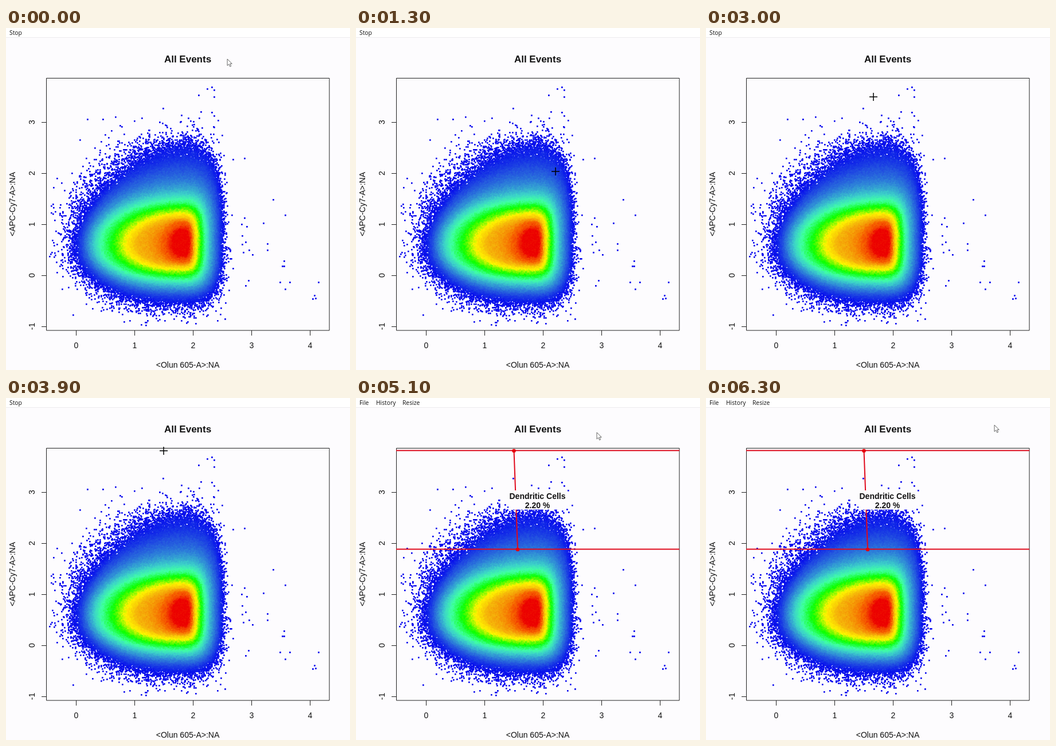
Write an HTML page with a canvas that moves like this. It is 600 px wide and 596 px high and loops after 6400 ms.

```html
<!DOCTYPE html>
<html lang="en">
<head>
<meta charset="utf-8">
<title>All Events</title>
<style>
  html, body { margin: 0; width: 100%; height: 100%; overflow: hidden; background: #fdfcfe; }
  canvas, svg { position: absolute; left: 0; top: 0; }
  svg { font: 14px "Liberation Sans", Arial, sans-serif; fill: #111; }
  .menu { font: 10.3px "Open Sans", "Noto Sans", sans-serif; }
  .mid { text-anchor: middle; }
  .bold { font-weight: bold; }
  .gate { stroke: #e00a1c; stroke-width: 2; fill: none; }
  .dot { fill: #e8000c; }
</style>
</head>
<body>
<canvas id="cloud" width="600" height="596"></canvas>
<svg width="600" height="596" viewBox="0 0 600 596">
  <rect width="600" height="16" fill="#fff"/>
  <path d="M0 16.5H600" stroke="#ececee"/>
  <text id="stop" class="menu" x="6" y="12">Stop</text>
  <g id="menu" class="menu">
    <text x="6" y="12">File</text><text x="35" y="12">History</text><text x="81" y="12">Resize</text>
  </g>
  <text class="mid bold" x="317" y="59.500" font-size="17">All Events</text>
  <g id="axes"><path d="M70.500 87.500H564V527H70.500Z" fill="none" stroke="#222"/></g>
  <text class="mid" x="317" y="592">&lt;Olun 605-A&gt;:NA</text>
  <text class="mid" transform="translate(16 307) rotate(-90)">&lt;APC-Cy7-A&gt;:NA</text>
  <g id="gate">
    <path class="gate" d="M70 91.500H564M70 263.500H564M275.500 92L282 264"/>
    <circle class="dot" cx="275.500" cy="92" r="3.300"/>
    <rect x="266" y="161" width="101" height="33.500" fill="#fdfcfe"/>
    <text class="mid bold" x="316.500" y="176">Dendritic Cells</text>
    <text class="mid bold" x="316.500" y="192">2.20 %</text>
  </g>
  <circle id="firstDot" class="dot" cx="282" cy="264" r="3.300"/>
  <path id="cross" d="M-7 0H7M0 -7V7" stroke="#000" stroke-width="1.500"/>
  <path id="arrow" d="M0 0V11.500L2.700 9L4.700 13.300L6.600 12.400L4.700 8.300H8.200Z" fill="#fff" stroke="#555" stroke-width=".9"/>
</svg>
<script>
const $ = id => document.getElementById(id);
const CENTER_X = 308, CENTER_Y = 376, LOOP = 6400;

// Density contours, inside out: left, right, top, bottom, upper-left roundness, colour
const LEVELS = [
  [290, 320, 352, 397, 2, [236, 0, 0]],
  [272, 325, 338, 409, 2, [246, 100, 0]],
  [228, 328, 332, 414, 1.9, [245, 180, 10]],
  [208, 333, 323, 421, 1.9, [255, 245, 0]],
  [186, 341, 311, 431, 2, [10, 255, 0]],
  [165, 348, 300, 440, 2, [64, 255, 165]],
  [155, 353, 290, 446, 2, [60, 212, 200]],
  [143, 362, 272, 456, 1.9, [48, 140, 215]],
  [134, 370, 245, 465, 1.8, [34, 80, 224]],
  [121, 378, 205, 479, 1.6, [8, 18, 236]],
  [101, 385, 186, 500, 2, [0, 0, 238]]
];

const OUTLIERS = [
  142,159, 169,159, 199,170, 274,140, 336,117, 351,106, 359,103, 363,108, 363,120, 340,146,
  359,147, 363,153, 306,152, 305,163, 318,157, 327,163, 268,164, 416,227, 396,229, 466,299,
  487,326, 449,340, 416,331, 411,342, 420,346, 412,362, 418,373, 412,377, 456,376, 456,387,
  424,387, 430,395, 485,406, 482,415, 485,415, 423,440, 418,449, 414,391, 478,443, 495,443,
  487,455, 545,443, 538,466, 540,471, 535,472, 382,507, 247,510, 88,408, 95,308, 102,283
];

let seed = 7;
function random() {
  seed = (seed + 0x6D2B79F5) | 0;
  let t = Math.imul(seed ^ seed >>> 15, 1 | seed);
  t = t + Math.imul(t ^ t >>> 7, 61 | t) ^ t;
  return ((t ^ t >>> 14) >>> 0) / 4294967296;
}

// Distance from the centre, relative to one contour (1 = on it)
function reach([left, right, top, bottom, round], x, y) {
  const isLeft = x < CENTER_X, isTop = y < CENTER_Y;
  const p = isLeft ? (isTop ? round : 2.2) : 3;
  const dx = (x - CENTER_X) / ((isLeft ? left : right) - CENTER_X);
  const dy = (y - CENTER_Y) / ((isTop ? top : bottom) - CENTER_Y);
  return (dx ** p + dy ** p) ** (1 / p);
}

function depth(x, y) {
  let outer = 0;
  for (let k = 0; k < LEVELS.length; k++) {
    const g = reach(LEVELS[k], x, y);
    if (g < 1) return k ? k - 1 + (outer - 1) / (outer - g) : 0;
    outer = g;
  }
  return LEVELS.length - 1 + (outer - 1) * 10;
}

function colour(v) {
  v = Math.min(Math.max(v, 0), LEVELS.length - 1.001);
  const k = Math.floor(v), a = LEVELS[k][5], b = LEVELS[k + 1][5];
  return `rgb(${a.map((c, i) => Math.round(c + (b[i] - c) * (v - k)))})`;
}

function drawCloud() {
  const ctx = $("cloud").getContext("2d");
  for (let i = 0; i < 260000; i++) {
    const x = 75 + random() * 325, y = 150 + random() * 370;
    const v = depth(x, y);
    if (random() > Math.exp(-1.9 * (v - 8))) continue;
    ctx.fillStyle = colour(v + (random() - .5) * .35);
    ctx.fillRect(Math.floor(x) - 1, Math.floor(y) - 1, 2.6, 2.6);
  }
  ctx.fillStyle = "#0000ee";
  for (let i = 0; i < OUTLIERS.length; i += 2)
    ctx.fillRect(OUTLIERS[i] - 1, OUTLIERS[i + 1] - 1, 2.7, 2.7);
}

function drawAxes() {
  let svg = "";
  for (let i = 0; i < 5; i++) {
    const x = 122.5 + 102 * i, y = 520 - 89 * i;
    svg += `<path d="M${x} 527v9M70 ${y + .5}h-8" stroke="#222"/>
      <text class="mid" x="${x}" y="558">${i}</text>
      <text class="mid" transform="translate(50 ${y}) rotate(-90)">${i - 1}</text>`;
  }
  $("axes").innerHTML += svg;
}

// Pointer path: time, x, y
const PATH = [
  [0, 386, 54], [200, 386, 60], [700, 372, 150], [1300, 348, 250], [2100, 295, 258],
  [2300, 282, 264], [2500, 282, 264], [3000, 292, 120], [3500, 276, 92], [3900, 275, 92],
  [4200, 286, 84], [4600, 286, 84], [5100, 420, 60], [5600, 482, 38], [6300, 503, 47]
];

function pointerAt(t) {
  const n = PATH.findIndex(p => p[0] > t);
  if (n < 0) return PATH[PATH.length - 1].slice(1);
  const [t0, x0, y0] = PATH[n - 1], [t1, x1, y1] = PATH[n];
  const s = (t - t0) / (t1 - t0), e = s * s * (3 - 2 * s);
  return [x0 + (x1 - x0) * e, y0 + (y1 - y0) * e];
}

const show = (id, on) => $(id).setAttribute("visibility", on ? "visible" : "hidden");

function frame(now) {
  const t = Math.floor(now % LOOP / 100) * 100;
  const picking = t < 4200, isCross = t >= 200 && t < 4700;
  show("stop", picking);
  show("menu", !picking);
  show("firstDot", !picking);
  show("gate", t >= 4700);
  show("cross", isCross);
  show("arrow", !isCross);
  $(isCross ? "cross" : "arrow").setAttribute("transform", `translate(${pointerAt(t).map(Math.round)})`);
  requestAnimationFrame(frame);
}

drawCloud();
drawAxes();
const start = performance.now();
requestAnimationFrame(now => frame(Math.max(0, now - start)));
</script>
</body>
</html>
```
